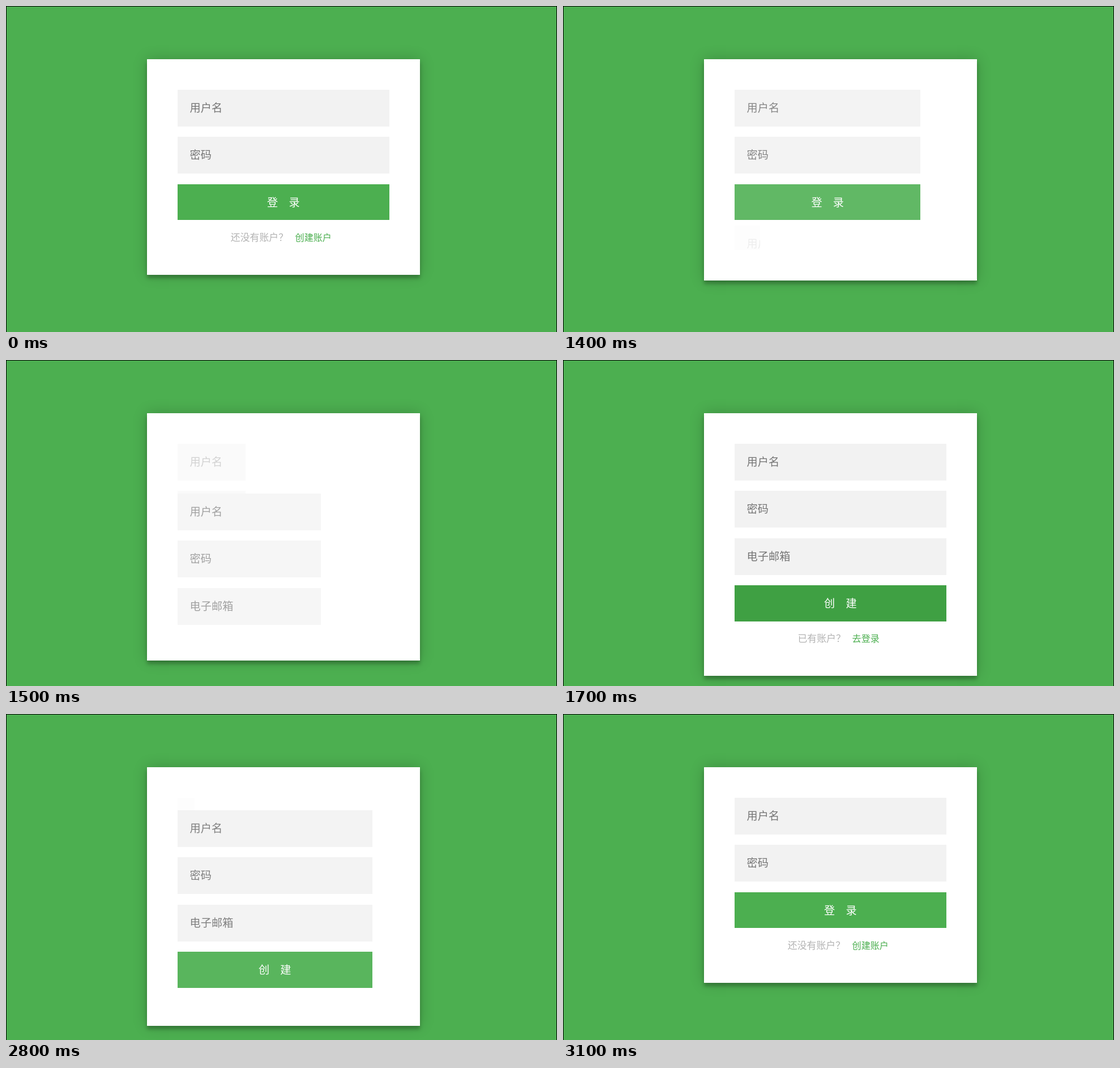
These frames come from a looping animation (973 by 576 pixels, 4.1 s). An HTML page:

```html
<!DOCTYPE html>
<html lang="zh">
<head>
<meta charset="utf-8">
<style>
  html, body { margin: 0; width: 100%; height: 100%; overflow: hidden; }
  body {
    position: relative; box-sizing: border-box;
    background: #4caf50; border: solid #000; border-width: 1px 1px 0;
    font: 19.2px "Noto Sans CJK SC", "Noto Sans CJK", sans-serif;
  }
  /* offsets are relative to the inside of the 1px border */
  #card {
    position: absolute; left: 248px; top: 92.6px; width: 481.6px; background: #fff;
    box-shadow: 0 0 24px rgba(0,0,0,.2), 0 6px 6px rgba(0,0,0,.24);
  }
  .form { position: absolute; left: 54px; overflow: hidden; }
  .form > * { position: absolute; left: 0; white-space: nowrap; }
  .field, .button { width: 100%; box-sizing: border-box; }
  .field { height: 65.2px; line-height: 63px; padding-left: 21.6px; background: #f2f2f2; color: #757575; }
  .button { height: 63.6px; line-height: 62px; background: #4caf50; color: #fff; text-align: center; }
  .note { font-size: 16.9px; line-height: 24px; color: #b3b3b3; }
  .link { font-size: 16.1px; line-height: 24px; color: #4caf50; }
</style>
</head>
<body>
<div id="card"></div>
<script>
const LOOP = 4100, WIDTH = 373.6, PAD = 54, PITCH = 83.6;
const GREEN = '#4caf50', HOVER = '#3fa043';
const card = document.getElementById('card');

function add(parent, cls, text, top = 0, left = 0) {
  const el = document.createElement('div');
  el.className = cls;
  el.textContent = text;
  el.style.top = top + 'px';
  if (left) el.style.left = left + 'px';
  return parent.appendChild(el);
}

function makeForm(height, fields, label, note, noteX, linkText) {
  const el = add(card, 'form', '');
  fields.forEach((name, i) => add(el, 'field', name, i * PITCH));
  const y = fields.length * PITCH;
  const button = add(el, 'button', label, y);
  add(el, 'note', note, y + 81, noteX);
  const link = add(el, 'link', linkText, y + 81, 207.6);
  return { el, height, button, link };
}

const login = makeForm(273.2, ['用户名', '密码'], '登　录', '还没有账户？', 93.8, '创建账户');
const signup = makeForm(356.4, ['用户名', '密码', '电子邮箱'], '创　建', '已有账户？', 111.4, '去登录');

// Opens a form to a share of its size and opacity, returns the height used
function open(form, top, share) {
  const h = form.height * share, s = form.el.style;
  s.top = top + 'px';
  s.width = WIDTH * share + 'px';
  s.height = h + 'px';
  s.opacity = share;
  return h;
}

// Swing easing, sampled every 100 ms
function swing(t, start, first) {
  if (t < start) return 0;
  const x = Math.min(1, first + .39 * Math.floor((t - start) / 100));
  return .5 - Math.cos(Math.PI * x) / 2;
}

function draw(now) {
  const t = now % LOOP;
  const share = swing(t, 1400, .226) - swing(t, 2800, .183);
  const h1 = open(login, PAD, 1 - share);
  const h2 = open(signup, PAD + h1, share);
  card.style.height = h1 + h2 + 2 * PAD + 'px';
  login.link.style.color = t >= 900 && t < 1400 ? '#43a047' : GREEN;
  signup.button.style.background = t >= 1700 && t < 2800 ? HOVER : GREEN;
}

const begin = performance.now();
function tick() {
  draw(performance.now() - begin);
  requestAnimationFrame(tick);
}
tick();
</script>
</body>
</html>
```
